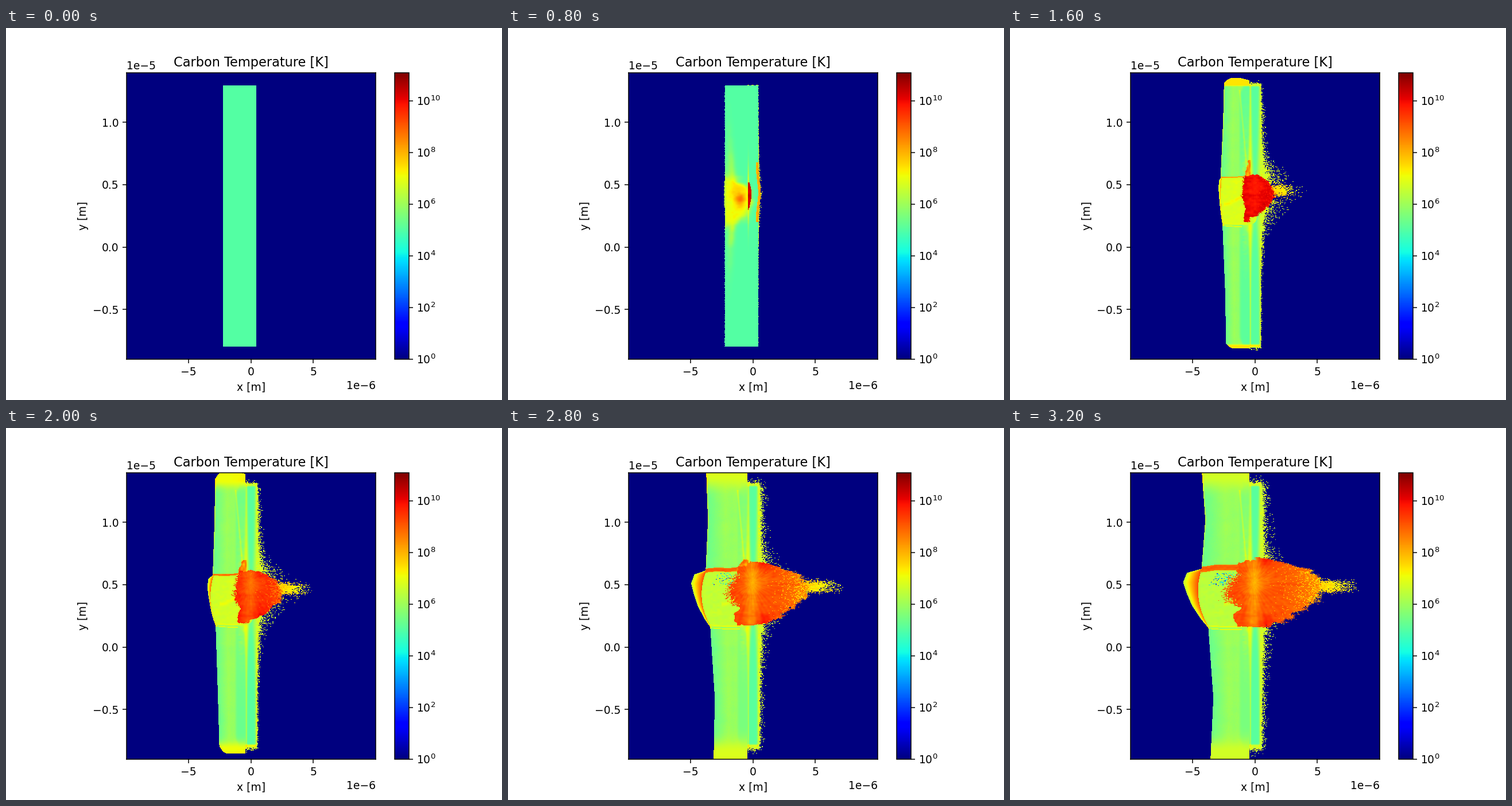
Animation of 864x648 px, one loop 3300 ms. Source, as a matplotlib script:

```python
import numpy as np
import matplotlib.pyplot as plt
from matplotlib.animation import FuncAnimation
from matplotlib.colors import LogNorm

FRAMES, STEP = 33, 100
W, H = 434, 499
X0, Y0 = 209.8, 77.8
TIMES = [8, 16, 20, 24, 28, 32]
X, Y = np.meshgrid(X0 + np.arange(W) + 0.5, Y0 + np.arange(H) + 0.5)
ROW = Y[:, :1]
rng = np.random.default_rng(7)


def cloud(sx, sy):
    """Smooth random field with cells of sx by sy."""
    gx, gy = np.arange(0, W + 2 * sx, sx), np.arange(0, H + 2 * sy, sy)
    grid = rng.normal(size=(len(gy), len(gx)))
    rows = np.array([np.interp(np.arange(W), gx, r) for r in grid])
    return np.array([np.interp(np.arange(H), gy, c) for c in rows.T]).T


def key(n, *vals):
    return np.interp(n, TIMES, vals)


def gauss(v, width):
    return np.exp(-(v / width) ** 2)


def sigmoid(v):
    return 1 / (1 + np.exp(-np.clip(v, -40, 40)))


SOFT = cloud(14, 9)
FINE = cloud(4, 3)
STREAK = cloud(30, 3)
GRAIN = rng.normal(size=(H, W))
JAG = rng.random((H, 1)) < 0.3
SPECK = np.repeat(rng.random((H, W // 2)), 2, axis=1)
SPECK_T = np.repeat(rng.normal(size=(H, W // 2)), 2, axis=1)

EDGE_Y = [78, 160, 250, 345, 470, 577]
EDGE_X = np.array([
    [378, 378, 378, 378, 378, 378],
    [373, 371, 367, 370, 375, 376],
    [364, 363, 360, 365, 369, 372],
    [355, 357, 352, 358, 365, 366],
    [345, 348, 344, 352, 360, 358],
    [334, 340, 333, 345, 354, 349]])
HALO_Y = [78, 100, 200, 230, 255, 283, 310, 335, 365, 420, 577]
HALO_16 = np.array([1, 1.5, 4, 8, 17, 24, 17, 9, 4, 1.5, 0.8])
HALO_32 = np.array([5, 6, 8, 13, 24, 28, 24, 14, 8, 5, 4])
BLOB_U = [0, 0.1, 0.2, 0.4, 0.6, 0.75, 0.9, 1]
TOP_16 = np.array([256, 255, 254, 255, 262, 268, 276, 288])
TOP_32 = np.array([232, 224, 225, 231, 238, 243, 248, 268])
LOW_16 = np.array([338, 332, 329, 328, 318, 310, 303, 290])
LOW_32 = np.array([347, 348, 348, 341, 332, 320, 306, 294])
RAG_Y = [225, 255, 275, 290, 303, 315, 322, 330, 345]
RAG_X = [-12, -17, -32, -38, -28, -8, -20, -24, -15]


def foil(n, left, late, ytop):
    """Target foil with its expanding rear side and end caps."""
    grow = np.clip((n - 8) / 8, 0, 1)
    corner = key(n, 0, 9, 13, 16, 16, 16) * np.clip(1 - (X - left) / 14, 0, 1) ** 2
    top = key(n, 99.4, 87, 76, 71, 55, 40) + corner + grow * 4 * np.clip((X - 402) / 15, 0, 1)
    low = key(n, 555, 558, 567, 577, 592, 605) - corner
    rear = (X > left) & (X < 417) & (Y > top) & (Y < low)
    core = (X >= 417) & (X < 436) & (Y > 99.4) & (Y < 555)
    u = (X - left) / (400 - left)
    zone = np.interp(u, [0, 0.1, 0.3, 0.6, 0.8, 1], [5.4, 5.4, 5.65, 6.0, 5.9, 6.0])
    zone = zone + 0.04 * SOFT + 0.04 * GRAIN
    inset = 6 * gauss(Y - 100, 10) + 6 * gauss(Y - 555, 10)
    hot = sigmoid((400 + inset - X) / 1.2) * grow
    L = 5 + 0.1 * grow + 0.4 * late * (X < 417)
    L = L + hot * (zone - L)

    soft = 2 + 20 * late
    cap = gauss(np.maximum(Y - 99 + 16 * late, 0), soft) + gauss(np.maximum(553 + 12 * late - Y, 0), soft)
    rim = gauss(np.maximum(Y - 99, 0), 2) + gauss(np.maximum(553 - Y, 0), 2)
    cap = grow * np.clip(np.where(X < 417, cap, rim), 0, 1)
    L = L + cap * np.maximum(key(n, 5, 7.4, 7.1, 6.9, 6.8, 6.7) - L, 0)

    reach = np.exp(np.clip(Y - 250, None, 0) / 75 - np.clip(Y - 345, 0, None) / 45)
    seam = gauss(X - 418.5, 1.2 + 3.5 * reach) * (0.75 + 0.4 * reach)
    slant = gauss(X - 400 - 12 * (Y - 110) / 130, 1.5) * ((Y > 108) & (Y < 255))
    side = gauss(X - 436, 2 + 4 * reach)
    fan = gauss(X - 410, 8) * reach
    L = L + grow * (1.5 * seam + 0.7 * slant + 1.3 * side + fan * (0.8 + 0.2 * FINE))
    L = L + grow * 1.2 * gauss(X - left, 1.6) * sigmoid((ytop - Y) / 30)
    return np.where(rear | core, np.minimum(L, 7.4), 0)


def plume(n, L, left, ytop, ylow):
    """Laser heated cavity and early filaments."""
    g = np.clip((n - 2) / 6, 0, 1)
    if g == 0:
        return L
    inside = L > 0
    early = np.clip(1 - (n - 8) / 6, 0, 1) * g
    bend = 384 + 14 * np.exp(-np.abs(Y - 300) / 60)
    fil = gauss(X - bend, 6) * gauss(Y - 300, 85) * (1 + 0.2 * SOFT)
    fil = fil + 0.6 * gauss(X - 380, 14) * gauss(Y - 290, 50)
    seam = gauss(X - 418.5, 1.3) * gauss(Y - 292, 45)
    L = np.where(inside, L + early * (1.4 * np.clip(fil, 0, 1.4) + 2.8 * g ** 3 * seam), L)

    mid, half = (ytop + ylow) / 2, (ylow - ytop) / 2
    power = np.interp(n, [8, 16], [2, 8])
    span = np.interp(n, [8, 16], [46, 52]) * g + np.maximum(378 - left, 0)
    dist = (np.abs(Y - mid) / (half * (0.4 + 0.6 * g))) ** power
    dist = dist + (np.abs(X - left) / np.maximum(span, 1)) ** power
    heat = key(n, 7.0, 6.8, 6.7, 6.6, 6.5, 6.4) + (0.08 + 0.12 * early) * SOFT + 0.06 * FINE
    heat = heat + early * (1.3 * gauss(X - 404, 9) * gauss(Y - 300, 9)
                           + 0.8 * gauss(X - 406, 14) * gauss(Y - 285, 24))
    heat = heat + 0.4 * (1 - early) * gauss(Y - 298 - 8 * np.sin(X / 14), 4) * (X > 372)
    sharp = np.interp(n, [8, 16], [8, 60])
    weight = sigmoid(sharp * (1 - dist - 0.15 * early * SOFT))
    return np.where(inside, L + weight * (heat - L), L)


def bulge(n, L, left, inner, v, ytop, ylow):
    """Rear blow-off with its hot arc and the bands that close the cavity."""
    shape = np.interp(v, [0, 0.07, 0.23, 0.4, 0.62, 0.85, 1], [0, 0.75, 1, 0.9, 0.7, 0.33, 0])
    outer = left - key(n, 1, 5, 11, 18, 27, 34) * shape
    rim = inner + 1.5
    late = np.clip((n - 8) / 8, 0, 1)
    band = (Y > ytop - 1) & (Y < ylow)
    s = np.clip((X - outer) / np.maximum(rim - outer, 1), 0, 1)
    heat = 6.5 + late * key(n, 1, 1.8, 2.4, 2.7, 2.7, 2.7) * s * (1 - 0.35 * v ** 3)
    L = np.where(band & (X > outer) & (X < rim), heat, L)
    if n < 10:
        return L

    thick = key(n, 1, 2, 3.5, 5, 7, 10)
    k = np.clip((X - left) / 80, 0, 1)
    mid = ytop + 0.15 * thick * np.sin(X / 10) - 7 * k ** 2
    off = np.abs(Y - mid) / (thick / 2)
    span = (X > left) & (X < 425)
    L = np.where(span & (off < 1), key(n, 7, 8.3, 8.8, 9, 9, 9) - 0.5 * off ** 2 + 0.1 * FINE, L)
    for dy in (-4, 1):
        line = np.abs(Y - ylow - dy - 2 * np.sin(k * 3)) < 0.9
        L = np.where(span & (X < 404) & line, 6.95, L)
    rise = key(n, 0, 32, 28, 24, 20, 16)
    climb = np.clip((Y - ytop + rise + 2 * FINE) / max(rise, 1), 0, 1)
    spur = (climb > 0) & (Y < ytop + 2) & (X > 417 - key(n, 2, 8, 14, 18, 20, 20) * climb ** 0.6)
    return np.where(spur & (X < 419), 8.5 + 0.3 * FINE, L)


def halo(n, L):
    """Sparse particles leaving the front surface."""
    if n < 7:
        return L
    p = np.clip((n - 16) / 16, 0, 1)
    h = np.interp(ROW, HALO_Y, HALO_16 + (HALO_32 - HALO_16) * p)
    h = h * np.clip((n - 7) / 9, 0.02, 1)
    dx = np.maximum(X - 436, 0)
    dy = np.maximum(np.maximum(99.4 - Y, Y - 555), 0)
    hy = key(n, 0.1, 2.5, 3.5, 4, 4.5, 5)
    prob = np.exp(-(dx / h) ** 1.2 - (dy / hy) ** 1.2) * 1.5
    on = (X > 417) & (L == 0) & (SPECK < prob) & (prob > 0.02)
    L = np.where(on, 6.7 + 0.25 * SPECK_T + 0.4 * gauss(Y - 283, 22), L)
    if n < 12:
        tip = 436 + np.interp(n, [7, 8, 11], [1.5, 4, 10]) * gauss(ROW - 287, 26)
        edge = (X < tip) & (X > tip - 4.5) & (np.abs(Y - 286) < 52)
        L = np.where(edge, 8.3 - 0.4 * (tip - X) / 4 + 0.1 * FINE, L)
    return L


def blob(n, L):
    """Hot core that breaks through the foil, and the forward jet."""
    if n < 7:
        return L
    p = np.clip((n - 16) / 16, 0, 1)
    right = key(n, 424, 461, 482, 500, 520, 540)
    base = key(n, 418, 412, 412, 412, 412, 412)

    if n > 9:
        yj, end = key(n, 283, 283, 280, 278, 276, 276), key(n, 440, 498, 526, 548, 576, 600)
        start = right - 25
        w = np.clip((X - start) / (end - start), 0, 2)
        body = np.exp(-np.abs((Y - yj) / (12 - 3 * np.clip(w, 0, 1))) ** 4)
        prob = body * np.clip(2.1 - 1.9 * w, 0, 1)
        jet = (X > start) & (SPECK < prob)
        L = np.where(jet, 7.9 - 0.8 * w + 0.15 * SPECK_T + 0.15 * STREAK, L)

    rough = np.interp(n, [8, 16, 32], [0, 0.4, 1])
    xs = X + rough * (3 * FINE + 4 * SOFT + 3 * STREAK * (X > 450) + 3 * GRAIN)
    ys = Y + rough * (1.2 * FINE + 1.5 * SOFT)
    u = (xs - base) / (right - base)
    size = np.interp(n, [7, 8, 16], [0.3, 0.6, 1])
    top = 290 + size * (np.interp(u, BLOB_U, TOP_16 + (TOP_32 - TOP_16) * p) - 290)
    low = 290 + size * (np.interp(u, BLOB_U, LOW_16 + (LOW_32 - LOW_16) * p) - 290)
    rag = base + key(n, 0, 0.2, 0.4, 0.6, 0.8, 1) * np.interp(ROW, RAG_Y, RAG_X)
    scatter = (1 + 5 * p) * SPECK_T * (np.abs(ROW - 282) < 28)
    mask = (u < 1) & (ys > top) & (ys < low) & (X > rag + 2 * FINE * rough + scatter * (n > 12))

    late = np.clip((n - 14) / 8, 0, 1)
    angle = np.arctan2(Y - 270, X - 424)
    rays = np.sin(17 * angle + 2 * SOFT) + np.sin(41 * angle)
    heat = key(n, 10.3, 10.1, 9.6, 9.35, 9.2, 9.15) + 0.07 * (FINE + STREAK + SOFT)
    heat = heat - late * (0.75 * gauss(X - 425, 11) - 0.06 * rays)
    heat = heat - late * 0.4 * gauss(Y - 268, 18) * gauss(X - 430, 22)
    heat = heat + late * 0.6 * gauss(X - 446, 18) * (gauss(Y - top, 14) + gauss(Y - low, 18))
    uc = np.clip(u, 0, 1)
    heat = heat - late * (0.6 * uc ** 2 + 1.1 * (SPECK < 0.5 * uc ** 4))
    L = np.where(mask, heat, L)

    if n > 22:
        void = (X > rag - 35) & (X < rag + 4) & (np.abs(Y - 263) < 12) & (L > 0) & (L < 7.5)
        L = np.where(void & (SPECK < 0.28 * (n - 22) / 10), 4.2 + 1.5 * SPECK_T, L)
    return L


def field(n):
    left = np.interp(ROW, EDGE_Y, [key(n, *c) for c in EDGE_X.T]) - JAG * (0 < n < 12)
    ytop = key(n, 260, 260, 256, 252, 248, 245)
    ylow = key(n, 345, 343, 344, 346, 347, 348)
    v = np.clip((ROW - ytop) / (ylow - ytop), 0, 1)
    inner = left - key(n, 0, 3, 8, 10, 12, 12) * 4 * v * (1 - v)
    late = np.clip((n - 16) / 8, 0, 1)
    L = foil(n, inner, late, ytop)
    L = plume(n, L, inner, ytop, ylow)
    if n >= 7:
        L = bulge(n, L, left, inner, v, ytop, ylow)
    L = halo(n, L)
    return 10 ** np.clip(blob(n, L), 0, 11)


fig, ax = plt.subplots(figsize=(6.4, 4.8), dpi=135)
im = ax.imshow(field(0), cmap="jet", norm=LogNorm(1, 1.22e11), interpolation="nearest",
               extent=(-9.99e-6, 9.99e-6, -8.99e-6, 1.399e-5))
fig.colorbar(im, ax=ax)
ax.set_title("Carbon Temperature [K]")
ax.set_xlabel("x [m]")
ax.set_ylabel("y [m]")


def update(n):
    im.set_data(field(n))
    return (im,)


anim = FuncAnimation(fig, update, frames=FRAMES, interval=STEP, repeat=True, repeat_delay=0)
plt.show()
```
